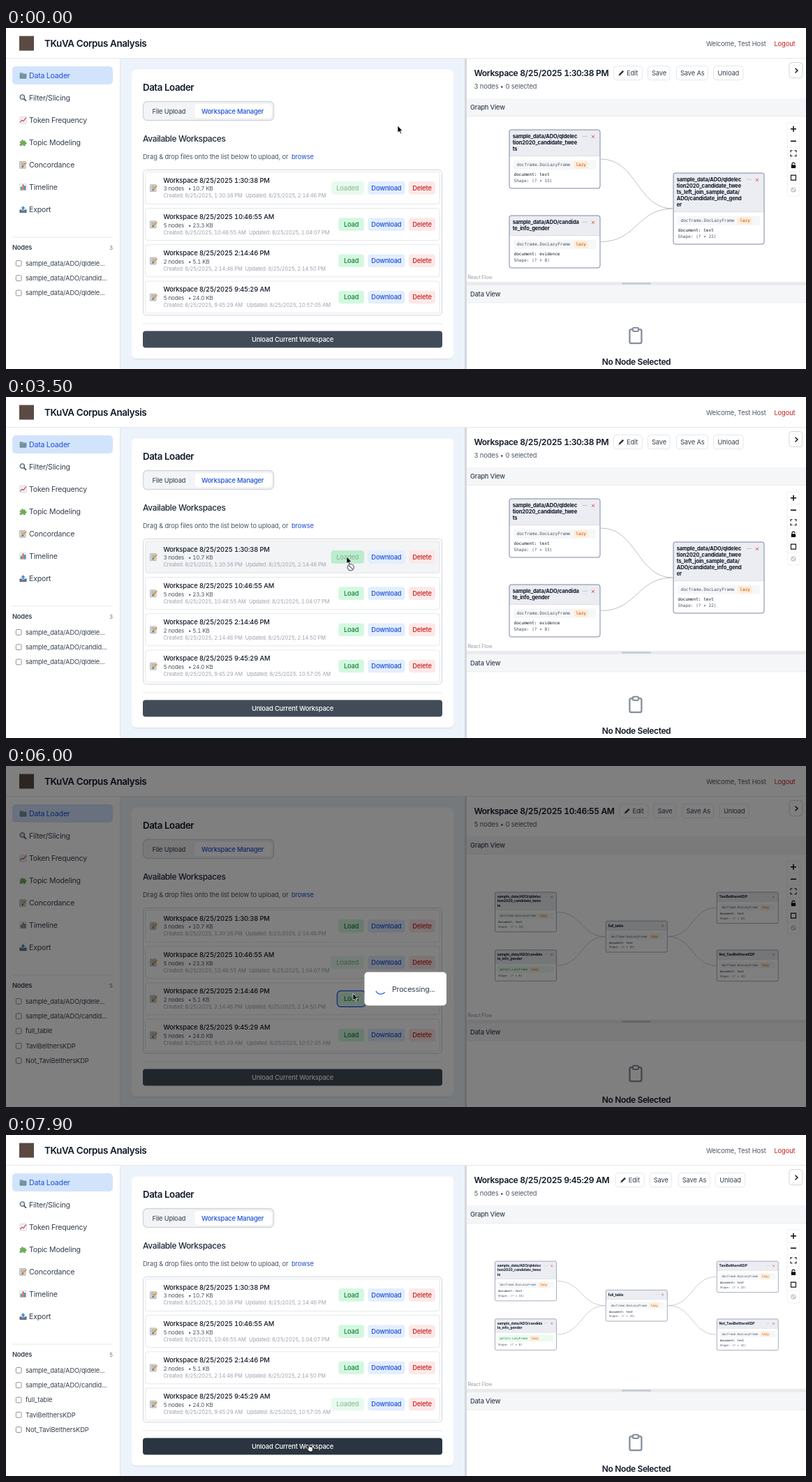
Animation of 1146x489 px, one loop 8 s. Source, as an HTML page:

```html
<!DOCTYPE html>
<html lang="en">
<head>
<meta charset="utf-8">
<title>Corpus Analysis</title>
<style>
html, body { margin: 0; width: 100%; height: 100%; overflow: hidden; background: #fff; }
svg { display: block; width: 100%; height: 100%; }
text { font-family: Inter, Roboto, sans-serif; font-variant-numeric: tabular-nums; white-space: pre; }
.mono { font-family: "DejaVu Sans Mono", "Liberation Mono", monospace; }
</style>
</head>
<body>
<svg viewBox="0 0 1146 489">
  <g id="page"></g>
  <g id="modal">
    <rect width="1146" height="489" opacity=".5"/>
    <rect x="513.5" y="295.5" width="117.5" height="48" rx="5" fill="#fff"/>
    <path id="spin" d="M543.5 323.6A7.8 7.8 0 0 1 530.5 323.6" fill="none" stroke="#2563eb" stroke-width="1.3"/>
    <text x="553" y="323.6" font-size="10.6" letter-spacing="-.21" fill="#374151">Processing...</text>
  </g>
  <g id="cursor">
    <path id="arrow" d="M0 0V10L2.3 7.9L3.8 11.4L5.4 10.7L3.9 7.4H7Z" fill="#000" stroke="#fff" stroke-width=".7"/>
    <g id="ban" fill="#f3f4f6" stroke="#6b7280" stroke-width="1.3"><circle cx="5.8" cy="15.2" r="4.6"/><path d="M2.6 12L9 18.4"/></g>
    <path id="hand" transform="translate(-4 -.5)" d="M3.2 1.2C3.2 .2 4.8 .2 4.8 1.2V4.6C5.2 4.1 6.3 4.2 6.5 4.9C7 4.5 8 4.7 8.1 5.4C8.7 5.1 9.6 5.4 9.6 6.2V8.5C9.6 10 8.8 10.4 8.6 11.6H4.2C4 10.3 2.6 9.2 1.2 7.4C.6 6.5 1.6 5.9 2.3 6.5L3.2 7.3Z" fill="#fff" stroke="#000" stroke-width=".9"/>
  </g>
</svg>
<script>
const LOOP = 8000, ROW_H = 52.2;
const INK = '#111827', DARK = '#374151', GREY = '#6b7280', LINE = '#e5e7eb', BLUE = '#1d4ed8';
const $ = id => document.getElementById(id);

// ---- drawing helpers ----
const tracking = (size, weight) => size >= 12 ? -.033 : size === 9.3 && weight === 400 ? -.01 : -.02;
const text = (x, y, s, size = 9.3, fill = DARK, weight = 400, anchor = 'start') =>
  `<text x="${x}" y="${y}" font-size="${size}" fill="${fill}" font-weight="${weight}" text-anchor="${anchor}" letter-spacing="${size * tracking(size, weight)}">${s}</text>`;
const mono = (x, y, s, fill) => `<text class="mono" x="${x}" y="${y}" font-size="6.1" fill="${fill}">${s}</text>`;
const rect = (x, y, w, h, fill, r = 0, stroke = 'none', sw = 1) =>
  `<rect x="${x}" y="${y}" width="${w}" height="${h}" rx="${r}" fill="${fill}" stroke="${stroke}" stroke-width="${sw}"/>`;
const path = (d, stroke, sw = 1, fill = 'none') => `<path d="${d}" stroke="${stroke}" stroke-width="${sw}" fill="${fill}"/>`;
const at = (x, y, s, z = 1) => `<g transform="translate(${x} ${y}) scale(${z})">${s}</g>`;

// ---- icons in an 11 x 11 box ----
const icons = {
  folder: path('M1 2H5L6 3.2H10V9.5H1Z', '#5d7482', .6, '#8fa5b0') + path('M2.5 4.5H9.5L8.5 9H1.5Z', '#5d7482', .5, '#6f98a8'),
  lens: path('M6.6 6.6L10 10', '#4b4f58', 1.7) + '<circle cx="4.3" cy="4.3" r="3.2" fill="#cfe6f5" stroke="#4b4f58" stroke-width="1.1"/>',
  trend: rect(.8, .8, 9.4, 9.4, '#f7f7f9', .6, '#b9c2cc', .6) + path('M1 3.6H10M1 6.6H10M4 1V10M7 1V10', '#cfd8e3', .4) + path('M1.3 8.5L4 5.5L6 6.8L9.8 1.8', '#d8344f', 1.2),
  puzzle: path('M1 4H3.4C2.6 1.2 6.2 1 5.7 3.6L8.4 3V5.4C11 4.6 11.2 8 8.6 7.6V10H5.8C6.2 8 3.4 8 3.8 10H1V7.4C3 7.8 3 5.2 1 5.8Z', '#4f8f3d', .4, '#6bb052'),
  memo: rect(.6, .8, 8.4, 9.8, '#e6e6e8', .5, '#8f9399', .7) + path('M2 2.8H7.6M2 4.6H6.8M2 6.4H5.6M2 8.8H7.4', '#737b87', .7) + path('M5 7.6L10.2 2.2', '#e39a2c', 2) + path('M4 8.7L5.2 7.4', '#333', 1.2),
  bars: rect(.8, .8, 9.4, 9.4, '#f5f6f8', .6, '#b9c2cc', .5) + rect(1.8, 5, 2, 4.8, '#3f9a56') + rect(4.5, 1.8, 2, 8, '#c94b4b') + rect(7.2, 3.5, 2, 6.3, '#3576bd'),
  out: path('M.8 6H3L4 7.6H7L8 6H10.2V10H.8Z', '#49545f', .6, '#6a7885') + path('M5.5 .8L8.3 3.8H6.6V6.6H4.4V3.8H2.7Z', '#2f73c2', .3, '#3f8fe0')
};

// ---- content ----
const menu = [['folder', 'Data Loader'], ['lens', 'Filter/Slicing'], ['trend', 'Token Frequency'], ['puzzle', 'Topic Modeling'],
  ['memo', 'Concordance'], ['bars', 'Timeline'], ['out', 'Export']];
const day = '8/25/2025';
const spaces = [
  { at: '1:30:38 PM', n: 3, kb: '10.7', upd: '2:14:46 PM', ux: 343, dx: 0 },
  { at: '10:46:55 AM', n: 5, kb: '23.3', upd: '1:04:07 PM', ux: 348, dx: 8.4 },
  { at: '2:14:46 PM', n: 2, kb: '5.1', upd: '2:14:50 PM', ux: 342.5, dx: 0 },
  { at: '9:45:29 AM', n: 5, kb: '24.0', upd: '10:57:05 AM', ux: 344.5, dx: 2.7 }
];
const ado = 'sample_data/ADO/', han = 'sample_data/Hansard/';
const tweets = [ado + 'qldelec', 'tion2020_candidate_twee', 'ts'];
const gender = [ado + 'candida', 'te_info_gender'];
const pick = 'TaviBelthersKDP';
const node = (x, y, lines, shape, doc = 'text') => ({ x, y, lines, shape, doc });

const trio = {
  z: 1, list: [ado + 'qldele...', ado + 'candid...', ado + 'qldele...'],
  nodes: [node(721, 146, tweets, 15), node(721, 269, gender, 8, 'evidence'),
    node(956, 208, [...tweets.slice(0, 2), 'ts_left_join_sample_data/', 'ADO/candidate_info_gend', 'er'], 22)],
  edges: [[0, 2], [1, 2]]
};
const split = {
  z: .677, list: [ado + 'qldele...', ado + 'candid...', 'full_table', pick, 'Not_' + pick],
  nodes: [node(700.5, 181, tweets, 15), node(700.5, 263.7, gender, 8, ''), node(859.3, 222.3, ['full_table'], 22),
    node(1018.3, 181, [pick], 22), node(1018.3, 263.9, ['Not_' + pick], 22)],
  edges: [[0, 2], [1, 2], [2, 3], [2, 4]]
};
const pair = {
  z: 1, list: [han + 'ho...', han + 'ec...'],
  nodes: [node(838, 146, [han + 'hou', 'sing_agenda'], 14), node(838, 269, [han + 'eco', 'nomy_agenda'], 13)],
  edges: []
};
const graphs = [trio, split, pair, split];

// ---- page parts ----
const header = () => rect(0, 0, 1146, 43, '#fff') + rect(0, 43, 1146, 1, LINE) +
  rect(19, 11.5, 21, 21, '#5b4a44') + text(55, 26.7, 'TKuVA Corpus Analysis', 13.5, INK, 600) +
  text(1003, 25.6, 'Welcome, Test Host', 9.3, '#4b5563') + text(1130.5, 25.6, 'Logout', 9.3, '#c81e1e', 400, 'end');

function sidebar(g) {
  let s = rect(0, 44, 163, 445, '#fff') + rect(163, 44, 1, 445, LINE) + rect(9, 55, 144, 26, '#d2e4fc', 5);
  menu.forEach(([icon, label], i) => {
    const y = 68 + i * 32;
    s += at(19, y - 5.3, icons[icon]) + text(33, y + 3.9, label, 10.6, i ? DARK : BLUE);
  });
  s += rect(9, 299.5, 144, 1, LINE) + text(9, 318, 'Nodes', 9.3, DARK, 600) + text(153, 317.8, g.list.length, 8, GREY, 400, 'end');
  g.list.forEach((name, i) => {
    const y = 337.4 + i * 21.3;
    s += rect(14.3, y - 3.9, 7.8, 7.8, '#fff', 1.6, '#767676', .8) + text(28, y + 3.3, name);
  });
  return s;
}

const pill = (x, w, y, label, bg, ink) => rect(x, y - 9.3, w, 18.6, bg, 4) + text(x + w / 2, y + 3.3, label, 9.3, ink, 500, 'middle');

function row(w, i, ws, hov, busy) {
  const y = 229.4 + i * ROW_H, over = hov.row === i, open = ws === i;
  let s = rect(199.5, y - 23, 422, 46, over ? '#f3f4f6' : '#fff', 4, LINE) + at(206, y - 5.5, icons.memo) +
    text(225.5, y - 7.8, `Workspace ${day} ${w.at}`, 9.4, INK, 500) +
    text(225.5, y + 4, w.n + ' nodes', 8, '#4b5563') + text(261, y + 4, `• ${w.kb} KB`, 8, '#4b5563') +
    text(225.5, y + 14, `Created: ${day}, ${w.at}`, 7.5, '#9ca3af') + text(w.ux, y + 14, `Updated: ${day}, ${w.upd}`, 7.5, '#9ca3af');
  const hot = over && hov.btn === 'load';
  s += open ? `<g opacity=".5">${pill(465.5, 47.5, y, 'Loaded', hot ? '#86e5a8' : '#d3f6de', '#15803d')}</g>`
    : pill(476.3, 36.7, y, 'Load', hot ? '#a5eebd' : '#d3f8df', '#15803d');
  if (busy === i) s += rect(474.5, y - 11.3, 40.2, 22.8, 'none', 5, '#2563eb', 1.5);
  return s + pill(518.3, 53.2, y, 'Download', over && hov.btn === 'down' ? '#c9dffd' : '#e3eefe', BLUE) +
    pill(577, 38, y, 'Delete', over && hov.btn === 'del' ? '#fdd0d0' : '#fde8e8', '#c81e1e');
}

const loader = (ws, hov, busy) => rect(164, 44, 493, 445, '#edf3fa') +
  rect(180, 60, 461, 415.5, '#dbe3ec', 6) + rect(180, 59.5, 461, 414.5, '#fff', 6) +
  text(196, 90.3, 'Data Loader', 13.3, INK, 600) +
  rect(196.5, 105.5, 187, 27, '#f3f4f6', 6, '#d1d5db', 1.3) + rect(269.5, 108.3, 112, 21.6, '#fff', 5, '#e8eaee', .7) +
  text(209.5, 122.6, 'File Upload', 9.3, '#4b5563', 500) + text(280, 122.6, 'Workspace Manager', 9.3, BLUE, 500) +
  text(196, 162.8, 'Available Workspaces', 12, '#1f2937', 500) +
  text(196, 188.3, 'Drag &amp; drop files onto the list below to upload, or', 9.3, '#4b5563') + text(409, 188.3, 'browse', 9.3, BLUE) +
  rect(196.5, 203.5, 428, 208.5, '#fff', 5, '#d1d5db') +
  spaces.map((w, i) => row(w, i, ws, hov, busy)).join('') +
  rect(196, 423.5, 429, 1, LINE) + rect(196, 434.5, 429, 24, hov.btn === 'close' ? '#2b3541' : '#424c58', 4) +
  text(410.5, 450, 'Unload Current Workspace', 9.4, '#fff', 500, 'middle');

function card(n, z) {
  const head = 11 + 9 * n.lines.length, h = head + (n.doc ? 46 : 37);
  const type = n.doc ? 'docframe.DocLazyFrame' : 'polars.LazyFrame', end = 10.5 + type.length * 3.67;
  let s = rect(0, 0, 130, h, '#fff', 3) + rect(0, 0, 130, head, '#ebedf2', 3) + rect(0, head - .5, 130, .6, '#d1d5db') +
    rect(0, 0, 130, h, 'none', 3, '#7d86a0', 1) +
    n.lines.map((l, i) => text(4.7, 12.4 + i * 9, l, 7.55, INK, 700)).join('') +
    text(104.5, 11.5, '···', 8, '#9ca3af', 700) + path('M118 7.8L122 11.8M122 7.8L118 11.8', '#e0393e', .9) +
    rect(6, head + 5.5, 118, 13.5, n.doc ? '#f6f7f9' : '#ebfbf0', 2) + mono(10.5, head + 14.4, type, n.doc ? '#4b5563' : '#15803d') +
    rect(end + 4.8, head + 7, 20.5, 10.5, '#ffedd5', 2.5) + mono(end + 7.8, head + 14.4, 'lazy', '#c2410c');
  if (n.doc) s += mono(6.5, head + 27.7, 'document: ' + n.doc, INK);
  s += mono(6.5, h - 8.7, `Shape: (? × ${n.shape})`, '#4b5563');
  return at(n.x, n.y, s, z);
}

const midY = (n, z) => n.y + (11 + 9 * n.lines.length + (n.doc ? 46 : 37)) * z / 2;

function edge(a, b, z) {
  const x = a.x + 130 * z + 1, m = (x + b.x) / 2, ya = midY(a, z), yb = midY(b, z);
  return path(`M${x} ${ya}C${m} ${ya} ${m} ${yb} ${b.x - 1} ${yb}`, '#b8b8be', Math.max(.7, z * .9));
}

function controls() {
  const marks = ['M-4 0H4M0 -4V4', 'M-4 0H4', 'M-4 -1.5V-4H-1.5M1.5 -4H4V-1.5M4 1.5V4H1.5M-1.5 4H-4V1.5',
    'M-2 -.5V-2A2 2 0 0 1 2 -2', 'M-3.5 -3.5H3.5V3.5H-3.5Z', 'M-2.1 -2.1L2.1 2.1M3 0A3 3 0 1 1 -3 0A3 3 0 1 1 3 0'];
  return rect(1119, 136, 18, 105, '#fff', 1, '#eceef1', .8) + marks.map((d, i) =>
    at(1128, 144.8 + i * 17.45, (i ? rect(-9, -8.8, 18, .6, '#eceef1') : '') + path(d, i === 5 ? '#b5b8bd' : '#111', i < 2 ? 1.6 : 1.1) +
      (i === 3 ? rect(-3.2, -.8, 6.4, 4.6, '#111', .8) : ''))).join('');
}

const tool = (x, w, label, tx, hot) => rect(x, 54.5, w, 20, hot ? '#f6f7f9' : '#fff', 4, LINE) + text(tx, 68, label, 9.3, DARK);

function panel(ws, g, hov) {
  const w = spaces[ws];
  return rect(657, 44, 3, 445, '#d5d9df') + rect(660, 44, 486, 445, '#fff') +
    text(670.5, 69, `Workspace ${day} ${w.at}`, 12.1, INK, 600) +
    at(w.dx, 0, tool(870.5, 41, 'Edit', 889) + path('M878.6 67.4L884.3 61.7', '#333', 2.4) + path('M877.6 68.5L879 67.1', '#333', 1) +
      tool(919.5, 31.5, 'Save', 925) + tool(960.5, 45, 'Save As', 966) + tool(1013.5, 42.5, 'Unload', 1019.5, hov.btn === 'unload')) +
    text(670.5, 87.2, `${w.n} nodes • 0 selected`, 9.3, '#4b5563') +
    rect(1122, 49.5, 19, 22, '#fff', 4, '#d1d5db') + path('M1130.5 57.8L1134 61L1130.5 64.2', '#111', 1.4) +
    rect(660, 101, 486, 25.5, '#f5f6f8') + rect(660, 126, 486, .7, LINE) + text(665, 117.3, 'Graph View', 9.3, DARK, 500) +
    g.edges.map(([a, b]) => edge(g.nodes[a], g.nodes[b], g.z)).join('') + g.nodes.map(n => card(n, g.z)).join('') + controls() +
    text(661.5, 360.3, 'React Flow', 7, '#999') +
    rect(660, 364, 486, 5, '#e9ebee') + rect(882, 365.6, 42, 2, '#bfc4cb', 1) +
    rect(660, 369, 486, 25, '#f5f6f8') + rect(660, 393.6, 486, .7, LINE) + text(665, 385, 'Data View', 9.3, DARK, 500) +
    rect(893.4, 432.2, 17, 20, 'none', 2.5, '#858e9c', 2.3) + rect(897.8, 429.8, 8.2, 5.2, '#fff', 2, '#858e9c', 2.1) +
    text(903, 482.5, 'No Node Selected', 12, INK, 600, 'middle');
}

// ---- motion ----
const stops = [[0, 561, 140], [1000, 561, 140], [1850, 1042, 64], [2400, 1042, 64], [3300, 488, 229], [3750, 488, 229], [4400, 496, 281.5],
  [5250, 496, 281.5], [5750, 497, 326], [6400, 497, 326], [6720, 497, 386], [7250, 497, 386], [7800, 434, 443], [LOOP, 434, 443]];
const loads = [{ from: 4690, to: 5150, row: 1 }, { from: 5980, to: 6380, row: 2 }, { from: 6930, to: 7190, row: 3 }];

function pointer(t) {
  const i = stops.findIndex((s, k) => k && t <= s[0]);
  const [t0, x0, y0] = stops[i - 1], [t1, x1, y1] = stops[i];
  const u = (t - t0) / (t1 - t0), e = u * u * (3 - 2 * u);
  return [x0 + (x1 - x0) * e, y0 + (y1 - y0) * e];
}

function hit(x, y, ws) {
  const inside = (a, b, c, d) => x >= a && x <= c && y >= b && y <= d;
  if (inside(196, 434, 625, 459)) return { btn: 'close' };
  const dx = spaces[ws].dx;
  if (inside(1013 + dx, 54, 1056 + dx, 75)) return { btn: 'unload' };
  const i = Math.round((y - 229.4) / ROW_H), dy = Math.abs(y - 229.4 - i * ROW_H);
  if (i < 0 || i > 3 || dy > 23 || x < 199 || x > 622) return {};
  let btn;
  if (dy < 9.5) {
    if (x > (i === ws ? 465 : 476) && x < 513) btn = 'load';
    else if (x > 518 && x < 572) btn = 'down';
    else if (x > 577 && x < 615) btn = 'del';
  }
  return { row: i, btn };
}

const show = (id, on) => $(id).style.display = on ? '' : 'none';
let last = '';

function draw(t) {
  const job = loads.find(l => t >= l.from && t < l.to);
  const ws = loads.filter(l => t >= l.to).length;
  const [x, y] = pointer(t), hov = job ? {} : hit(x, y, ws);
  const key = [ws, job && job.row, hov.row, hov.btn].join();
  if (key !== last) {
    const g = graphs[ws];
    $('page').innerHTML = loader(ws, hov, job && job.row) + sidebar(g) + panel(ws, g, hov) + header();
    last = key;
  }
  show('modal', job);
  if (job) $('spin').setAttribute('transform', `rotate(${(t - job.from) * .36} 537 319.3)`);
  const barred = hov.btn === 'load' && hov.row === ws, hand = hov.btn && !barred;
  show('hand', hand);
  show('arrow', !hand);
  show('ban', barred);
  $('cursor').setAttribute('transform', `translate(${x} ${y})`);
}

function tick() {
  draw(performance.now() % LOOP);
  requestAnimationFrame(tick);
}
tick();
</script>
</body>
</html>
```
